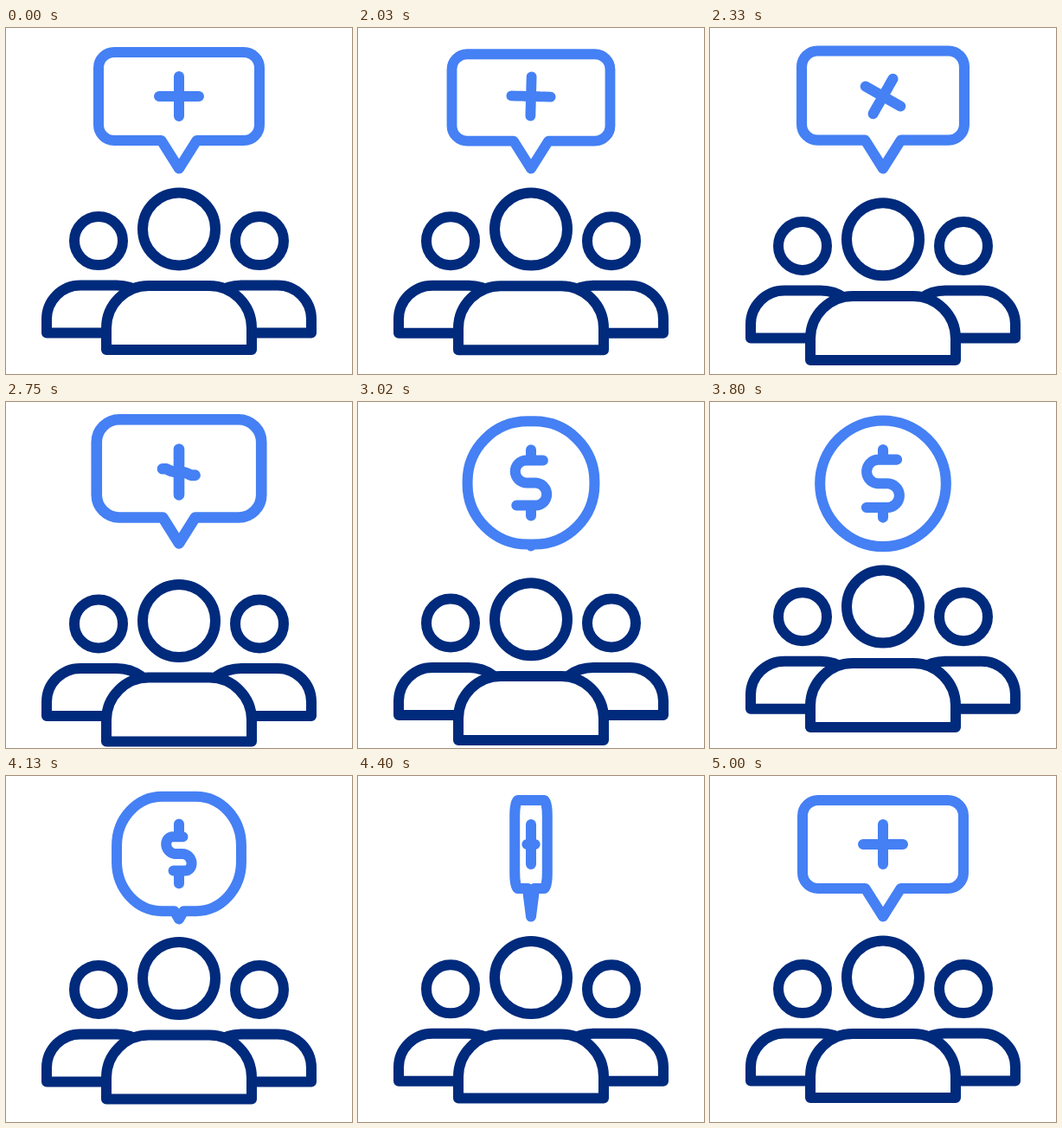
Recreate the animation shown at these times as an HTML page with a canvas. Size 400x400 px, loop 5030 ms.

```html
<!DOCTYPE html>
<html lang="en">
<head>
<meta charset="utf-8">
<title>Group feedback icon</title>
<style>
html, body { margin: 0; width: 100%; height: 100%; overflow: hidden; background: #fff; }
canvas { display: block; width: 100vmin; height: 100vmin; }
</style>
</head>
<body>
<canvas id="stage" width="400" height="400"></canvas>
<script>
const ctx = document.getElementById('stage').getContext('2d');
const NAVY = '#002a7c', BLUE = '#4580f4';
const LOOP = 5030, START = 2030, STEP = 30, LINE = 12;
const COIN_Y = 94.3, PLUS_Y = 79, TIP_Y = 166;

const mix = (a, b, k) => a + (b - a) * k;
const span = (t, a, b) => Math.min(1, Math.max(0, (t - a) / (b - a)));
const smooth = u => u * u * (3 - 2 * u);
const ramp = (t, a, b) => smooth(span(t, a, b));
const bump = (t, a, b) => Math.sin(Math.PI * span(t, a, b)) ** 2;

// Quick start and long settle: cubic-bezier(0.4, 0, 0.2, 1).
function settle(t, a, b) {
  const x = span(t, a, b);
  let lo = 0, hi = 1;
  for (let i = 0; i < 20; i++) {
    const s = (lo + hi) / 2, r = 1 - s;
    if (1.2 * s * r * r + 0.6 * s * s * r + s ** 3 < x) lo = s; else hi = s;
  }
  return smooth(lo);
}

function head(x, y, r) {
  ctx.beginPath();
  ctx.arc(x, y, r, 0, Math.PI * 2);
  ctx.stroke();
}

function sideBody() {
  ctx.beginPath();
  ctx.moveTo(116, 353);
  ctx.lineTo(47, 353);
  ctx.arcTo(47, 298, 128, 298, 39);
  ctx.lineTo(128, 298);
  ctx.bezierCurveTo(139, 298, 148, 301, 156, 307);
  ctx.stroke();
}

function frontBody() {
  ctx.beginPath();
  ctx.moveTo(116, 372);
  ctx.arcTo(116, 298, 200, 298, 49);
  ctx.arcTo(284, 298, 284, 372, 49);
  ctx.lineTo(284, 372);
  ctx.closePath();
  ctx.fillStyle = '#fff';
  ctx.fill();
  ctx.stroke();
}

function people(t) {
  const sink = 20.7 * (ramp(t, 2000, 2600) - settle(t, 2650, 4850));
  ctx.strokeStyle = NAVY;
  ctx.lineWidth = LINE;
  for (const side of [1, -1]) {
    ctx.save();
    ctx.translate(200, sink / 2 - 0.4);
    ctx.scale(side, 1);
    ctx.translate(-200, 0);
    head(107, 246.5, 28);
    sideBody();
    ctx.restore();
  }
  ctx.save();
  ctx.translate(0, sink);
  head(200, 232.4, 42);
  frontBody();
  ctx.restore();
}

// Speech bubble at k = 0, coin at k = 1.
function outline(k) {
  const w = mix(93, 72.3, k), top = mix(28, 22, k), low = mix(130, 166.6, k);
  const r = mix(18, 72.3, k), tail = mix(20.5, 0, k), tip = mix(162.5, 166.6, k);
  ctx.moveTo(-tail, low);
  ctx.arcTo(-w, low, -w, top, r);
  ctx.arcTo(-w, top, w, top, r);
  ctx.arcTo(w, top, w, low, r);
  ctx.arcTo(w, low, tail, low, r);
  ctx.lineTo(tail, low);
  ctx.lineTo(0, tip);
  ctx.closePath();
}

// The S of the dollar: two half circles joined by straight strokes.
function dollarCurve() {
  const r = 13.75, n = 16, pts = [[16, -2 * r]];
  for (const side of [-1, 1]) {
    for (let i = 0; i <= n; i++) {
      const a = Math.PI * i / n;
      pts.push([side * (5 + r * Math.sin(a)), side * r - r * Math.cos(a)]);
    }
  }
  pts.push([-19, 2 * r]);
  let len = 0;
  const along = pts.map((p, i) => len += i ? Math.hypot(p[0] - pts[i - 1][0], p[1] - pts[i - 1][1]) : 0);
  return pts.map(([x, y], i) => ({ x, y, u: along[i] / len }));
}
const CURVE = dollarCurve();

// Plus at k = 0, dollar at k = 1.
function sign(k) {
  CURVE.forEach(({ x, y, u }, i) => {
    const px = mix(mix(-23, 23, u), x, k), py = y * k;
    if (i) ctx.lineTo(px, py); else ctx.moveTo(px, py);
  });
  for (const s of [-1, 1]) {
    ctx.moveTo(0, s * mix(23, 39, k));
    ctx.lineTo(0, s * mix(0, 27.5, k));
  }
}

function badge(t) {
  const k = ramp(t, 2655, 3080) - ramp(t, 4010, 4350);
  const pop = 1 - 0.17 * bump(t, 2000, 2300) + 0.07 * bump(t, 2230, 3020);
  const pulse = 1 - 0.165 * bump(t, 3080, 3540) + 0.03 * bump(t, 3500, 3860);
  const flip = Math.max(0.001, Math.abs(1 - 2 * settle(t, 4010, 5000)));
  const spin = Math.PI * (ramp(t, 2000, 2540) % 1);
  const size = pop * pulse;

  ctx.strokeStyle = BLUE;
  ctx.lineWidth = LINE * size;
  ctx.beginPath();
  ctx.save();
  ctx.translate(200, mix(TIP_Y, COIN_Y, k));
  ctx.scale(size * flip, size);
  ctx.translate(0, -mix(TIP_Y, COIN_Y, k));
  outline(k);
  ctx.restore();

  ctx.save();
  ctx.translate(200, mix(PLUS_Y, COIN_Y, k));
  ctx.scale(size * flip, size);
  ctx.rotate(spin);
  sign(k);
  ctx.restore();
  ctx.stroke();
}

function draw(t) {
  ctx.fillStyle = '#fff';
  ctx.fillRect(0, 0, 400, 400);
  ctx.lineCap = ctx.lineJoin = 'round';
  people(t);
  badge(t);
}

const begin = performance.now();
function tick() {
  const t = (performance.now() - begin) % LOOP;
  draw(t < START ? 0 : START + Math.floor((t - START) / STEP) * STEP);
  requestAnimationFrame(tick);
}
tick();
</script>
</body>
</html>
```
